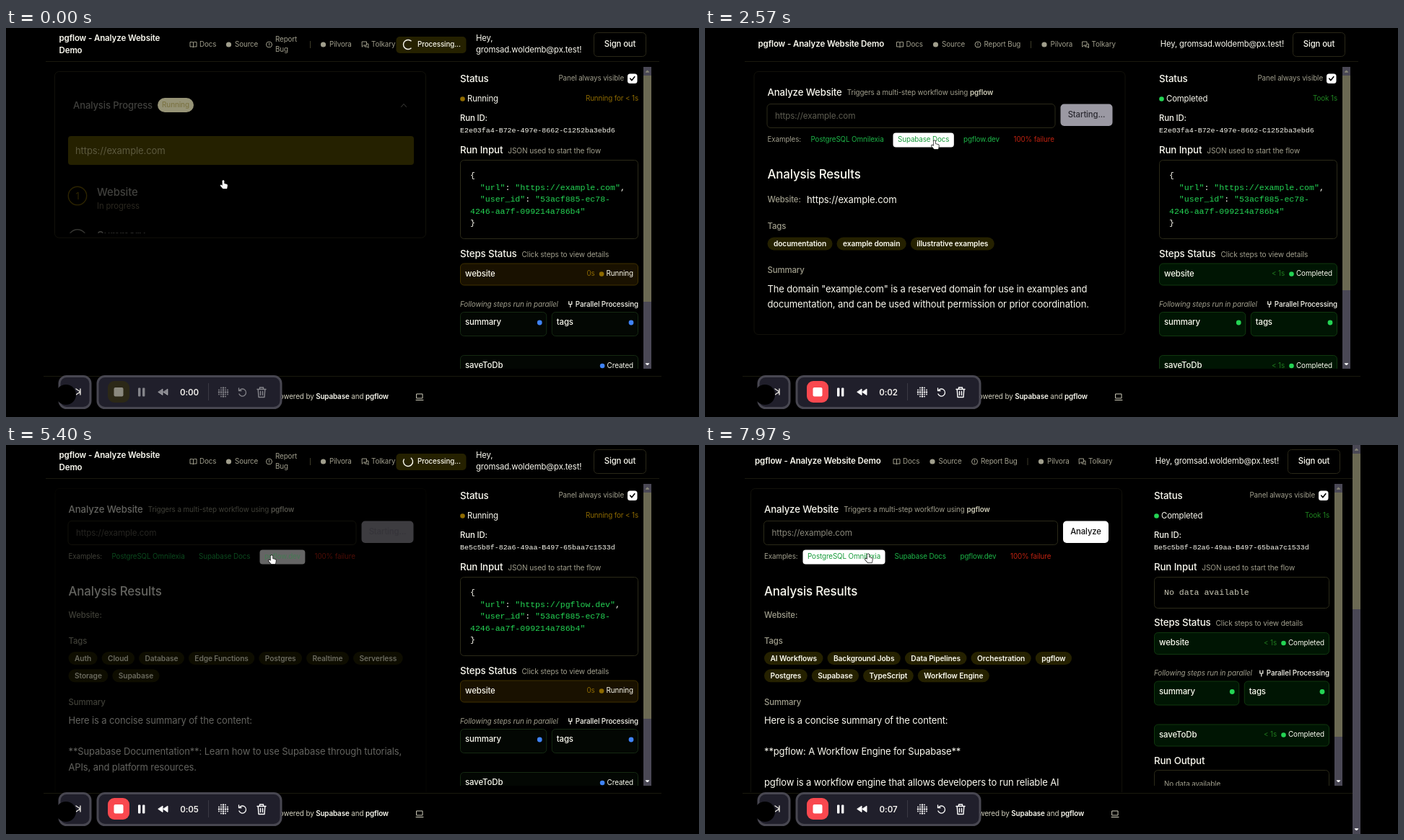
Animation, 960 px wide and 540 px high, one loop 8000 ms. Source, as an HTML page with a canvas:

```html
<!DOCTYPE html>
<html lang="en">
<head>
<meta charset="utf-8">
<title>pgflow demo</title>
<style>
  html, body { margin: 0; height: 100%; overflow: hidden; background: #000; }
  canvas { display: block; }
</style>
</head>
<body>
<canvas id="stage" width="960" height="540"></canvas>
<script>
const ctx = document.getElementById('stage').getContext('2d');
const LOOP = 8000;
const SANS = 'Inter, "Open Sans", sans-serif';
const MONO = '"Liberation Mono", "DejaVu Sans Mono", monospace';
const WHITE = '#fbfaf0', MUTED = '#a09e8c', DIM = '#89877a', LINE = '#1a190e', CARD = '#12110a';
const OLIVE = '#252100', GREEN = '#24d454', LINK = '#1db548', AMBER = '#8f6b00';
const EMAIL = 'gromsad.woldemb@px.test!';

const STATUS = {
  Completed: { bg: '#001503', border: '#10380f', dot: GREEN, time: '< 1s', timeColor: '#1f7a1f' },
  Running: { bg: '#191100', border: '#403000', dot: AMBER, time: '0s', timeColor: AMBER },
  Created: { bg: '#030703', border: '#152a12', dot: '#3f83f8', time: '', timeColor: DIM },
};

// web, tags, done and results are the moments at which each stage finishes.
const RUNS = [
  { start: -430, web: 350, tags: 800, done: 880, results: 1500, took: '1s', thumb: 0,
    id: 'E2e03fa4-B72e-497e-8662-C1252ba3ebd6', url: 'https://example.com', keepsInput: true,
    labels: [['documentation', 'example domain', 'illustrative examples']],
    summary: ['The domain "example.com" is a reserved domain for use in examples and',
      'documentation, and can be used without permission or prior coordination.'] },
  { start: 2650, web: 3000, tags: 3280, done: 3450, results: 3750, took: '< 1s', thumb: 282,
    id: '1b219c19-44de-43d9-92b3-E03d43b3d71a', url: 'https://supabase.com/docs',
    labels: [['Auth', 'Cloud', 'Database', 'Edge Functions', 'Postgres', 'Realtime', 'Serverless'],
      ['Storage', 'Supabase']],
    summary: ['Here is a concise summary of the content:', '',
      '**Supabase Documentation**: Learn how to use Supabase through tutorials,',
      'APIs, and platform resources.'] },
  { start: 5250, web: 5600, tags: 6100, done: 6250, results: 6500, took: '1s', thumb: 228,
    id: 'Be5c5b8f-82a6-49aa-B497-65baa7c1533d', url: 'https://pgflow.dev',
    labels: [['AI Workflows', 'Background Jobs', 'Data Pipelines', 'Orchestration', 'pgflow'],
      ['Postgres', 'Supabase', 'TypeScript', 'Workflow Engine']],
    summary: ['Here is a concise summary of the content:', '',
      '**pgflow: A Workflow Engine for Supabase**', '',
      'pgflow is a workflow engine that allows developers to run reliable AI'] },
];

const EXAMPLES = [['PostgreSQL Omnilexia', 60], ['Supabase Docs', 180.5],
  ['pgflow.dev', 271.5], ['100% failure', 341]];

const POINTER = [[0, 301, 212], [1000, 301, 212], [1200, 307, 210], [1750, 307, 210],
  [2300, 318, 157], [4250, 318, 157], [4850, 368, 154], [6750, 368, 154], [7550, 226, 152], [LOOP, 226, 152]];

const clamp = v => Math.min(1, Math.max(0, v));
const ease = v => v * v * (3 - 2 * v);

function setFont(size, { weight = 400, font = SANS, style = '' } = {}) {
  ctx.font = `${style} ${weight} ${size}px ${font}`;
  ctx.letterSpacing = font === SANS ? `${-0.01 * size}px` : '0px';
}

function textWidth(str, size, options) {
  setFont(size, options);
  return ctx.measureText(str).width;
}

// Draws text centred vertically on y and returns its width.
function text(str, x, y, size, color = WHITE, options = {}) {
  setFont(size, options);
  ctx.textAlign = options.align || 'left';
  ctx.fillStyle = color;
  ctx.fillText(str, x, y + size * 0.35);
  return ctx.measureText(str).width;
}

function box(x, y, w, h, r, fill, stroke, lineWidth = 1) {
  ctx.beginPath();
  ctx.roundRect(x, y, w, h, r);
  if (fill) { ctx.fillStyle = fill; ctx.fill(); }
  if (stroke) { ctx.strokeStyle = stroke; ctx.lineWidth = lineWidth; ctx.stroke(); }
}

function circle(x, y, r, fill, stroke, lineWidth = 1) {
  box(x - r, y - r, 2 * r, 2 * r, r, fill, stroke, lineWidth);
}

function path(d, x, y, color, lineWidth = 1, filled = false) {
  ctx.save();
  ctx.translate(x, y);
  ctx.lineCap = ctx.lineJoin = 'round';
  ctx.strokeStyle = ctx.fillStyle = color;
  ctx.lineWidth = lineWidth;
  const shape = new Path2D(d);
  if (filled) ctx.fill(shape);
  ctx.stroke(shape);
  ctx.restore();
}

function clipped(x, y, w, h, draw) {
  ctx.save();
  ctx.beginPath();
  ctx.rect(x, y, w, h);
  ctx.clip();
  draw();
  ctx.restore();
}

function faded(alpha, draw) {
  ctx.save();
  ctx.globalAlpha *= clamp(alpha);
  draw();
  ctx.restore();
}

const hline = (x1, x2, y) => box(x1, y, x2 - x1, 1, 0, LINE);

function scrollbar(x, top, bottom, thumbEnd) {
  box(x, top, 11, bottom - top, 0, '#4a4855');
  box(x, top + 12, 11, thumbEnd - top - 12, 0, '#6b6953');
  path('M-2 1L0 -1L2 1Z', x + 5.5, top + 6, '#8a8878', 1, true);
  path('M-2 -1L0 1L2 -1Z', x + 5.5, bottom - 6, '#fff', 1, true);
}

function navIcon(kind, x, y) {
  if (kind === 'book') path('M0 -3Q-2 -4 -4.5 -3.5V3Q-2 2.5 0 3.5Q2 2.5 4.5 3V-3.5Q2 -4 0 -3V3.5', x, y, MUTED);
  else if (kind === 'chat') path('M-4 -4H2V1H-2L-4 3ZM3 -1H4.5V4.5L3 3H-0.5V1.5', x, y, MUTED);
  else if (kind === 'alert') { circle(x, y, 4, null, MUTED); path('M0 -2V0.3M0 2V2.1', x, y, MUTED); }
  else circle(x, y, 3.6, MUTED);
}

function header(s) {
  const { dx, busy, run, t } = s;
  const bold = { weight: 600 };
  if (busy) {
    text('pgflow - Analyze Website', 73.5, 14, 11.5, WHITE, bold);
    text('Demo', 73.5, 30.5, 11.5, WHITE, bold);
  } else text('pgflow - Analyze Website Demo', 73.5 - dx, 22, 11.5, WHITE, bold);

  const xs = busy ? [268, 317, 373, 448, 506] : [278.5, 328, 386.5, 478.5, 535.5].map(x => x - dx);
  ['Docs', 'Source', 'Report Bug', 'Pilvora', 'Tolkary'].forEach((label, i) => {
    navIcon(['book', 'dot', 'alert', 'dot', 'chat'][i], xs[i] - 8.5, 23);
    if (busy && i === 2) {
      text('Report', xs[i], 16, 9.8, MUTED);
      text('Bug', xs[i], 29.5, 9.8, MUTED);
    } else text(label, xs[i], 23, 9.8, MUTED);
  });
  box(busy ? 421 : 451 - dx, 18, 1, 10, 0, '#3d3b28');

  const shift = dx ? 7 : 0;
  if (busy) {
    box(540.5, 12, 97, 23, 5, OLIVE);
    const gap = ((t - run.start) / 1000 - 0.43) * Math.PI * 2;
    ctx.beginPath();
    ctx.arc(557, 23, 6.5, gap + 0.8, gap + Math.PI * 2 - 0.8);
    ctx.strokeStyle = WHITE;
    ctx.lineWidth = 1.4;
    ctx.stroke();
    text('Processing...', 570, 23, 9.8, WHITE, { weight: 500 });
    text('Hey,', 651, 14, 11.3);
    text(EMAIL, 651, 30.5, 11.3);
  } else text('Hey, ' + EMAIL, 802 - shift, 22, 11.2, WHITE, { align: 'right' });
  box(814.5 - shift, 6.5, 72, 33, 5, null, '#2a2818');
  text('Sign out', 850.5 - shift, 22, 11.3, WHITE, { weight: 500, align: 'center' });
  hline(55, dx ? 897 : 905, 46);
}

function stepBox(x, y, w, h, name, state, compact) {
  const look = STATUS[state], right = x + w;
  box(x + 0.5, y + 0.5, w - 1, h - 1, 5, look.bg, look.border);
  text(name, x + 7, y + 14.5, 11.4, WHITE, { weight: 500 });
  if (compact) return circle(right - 10, y + 15, 3.4, look.dot);
  const width = text(state, right - 7, y + 14.5, 9.9, WHITE, { align: 'right' });
  circle(right - 13.5 - width, y + 15, 3.3, look.dot);
  text(look.time, right - 23 - width, y + 14.5, 9.8, look.timeColor, { align: 'right' });
}

function panel(s) {
  const { run, phase, dx, json } = s;
  const x = dx ? 622 : 629, w = dx ? 243 : 247, right = x + w;
  const complete = phase >= 3;
  const heading = (label, y, note) => {
    const width = text(label, x, y, 13.3, WHITE, { weight: 500 });
    if (note) text(note, x + width + 7, y + 1, 10.1, MUTED);
  };
  clipped(x - 10, 50, w + 20, 423, () => {
    heading('Status', 70);
    text('Panel always visible', right - 20, 70, 9.8, MUTED, { align: 'right' });
    box(right - 15, 63.5, 13.5, 13.5, 3.5, '#fff');
    path('M-3 0L-1 2.5L3 -2.5', right - 8.2, 70.2, '#000', 1.6);
    const state = complete ? 'Completed' : 'Running';
    circle(x + 3.5, 98.5, 3.3, STATUS[state].dot);
    text(state, x + 10, 98, 11.3);
    text(complete ? 'Took ' + run.took : 'Running for < 1s', right, 98, 9.8,
      complete ? '#1f8420' : AMBER, { align: 'right' });
    text('Run ID:', x, 125, 11.3, WHITE, { weight: 500 });
    text(run.id, x, 142, 9.95, WHITE, { font: MONO });

    heading('Run Input', 169.5, 'JSON used to start the flow');
    box(x + 0.5, 183.5, w - 1, json ? 109 : 43, 5, null, '#2b2a18');
    const code = (str, col, y, color) => text(str, x + 14 + col * 6.93, y, 11.55, color, { font: MONO });
    if (json) {
      code('{', 0, 204, WHITE);
      code('"url"', 2, 220.5, GREEN);
      code(':', 7, 220.5, WHITE);
      code(`"${run.url}"`, 9, 220.5, GREEN);
      code(',', 11 + run.url.length, 220.5, WHITE);
      code('"user_id"', 2, 237, GREEN);
      code(':', 11, 237, WHITE);
      code('"53acf885-ec78-', 13, 237, GREEN);
      code('4246-aa7f-099214a786b4"', 0, 253.5, GREEN);
      code('}', 0, 270, WHITE);
    } else code('No data available', 0, 204, '#c9c7b4');

    const y = json ? 66.5 : 0, half = (w - 6.5) / 2;
    heading('Steps Status', 246.5 + y, 'Click steps to view details');
    stepBox(x, 260 + y, w, 31, 'website', phase ? 'Completed' : 'Running');
    text('Following steps run in parallel', x, 317 + y, 9.9, MUTED, { style: 'italic' });
    const label = text('Parallel Processing', right, 317 + y, 9.8, WHITE, { weight: 500, align: 'right' });
    path('M-2 -4V0H2V-4M0 0V4', right - label - 7, 317 + y, WHITE, 1.2);
    const mid = ['Created', 'Running', 'Running', 'Completed'][Math.min(phase, 3)];
    const early = phase === 2;
    stepBox(x, 327.5 + y, half, 34, early ? 'tags' : 'summary', early ? 'Completed' : mid, true);
    stepBox(right - half, 327.5 + y, half, 34, early ? 'summary' : 'tags', mid, true);
    stepBox(x, 387.5 + y, w, 31, 'saveToDb', complete ? 'Completed' : 'Created');
    heading('Run Output', 438 + y);
    if (complete) {
      box(x + 0.5, 451.5 + y, w - 1, 60, 5, null, '#2b2a18');
      text('No data available', x + 14, 471 + y, 9.8, MUTED);
    } else text('Run is not completed yet - no output available', x, 458 + y, 9.9, MUTED);
  });
  scrollbar(dx ? 872 : 883, 54, 473, complete ? (json ? 364 : 405) : (json ? 380 : 428));
}

function step(cx, y, name, state, number) {
  const cy = y + 5;
  const color = { Completed: GREEN, 'In progress': '#b08c00', Waiting: '#d5d3c4' }[state];
  if (state === 'Completed') {
    circle(cx, cy, 13.3, GREEN);
    path('M-4 0L-1 3L4 -3', cx, cy, '#fff', 1.3);
  } else {
    circle(cx, cy, 12.7, null, color, 1.4);
    text(number, cx, cy, 13, color, { align: 'center' });
  }
  text(name, cx + 27, y, 14.9, WHITE, { weight: 500 });
  text(state, cx + 27, y + 19.5, 11.3, state === 'In progress' ? '#a5997a' : MUTED);
}

function progressCard({ run, phase, json, t }) {
  const enter = clamp((t - run.start - 355) / 300);
  if (!enter) return;
  const drop = 12 * (1 - enter), bottom = (json ? 441 : 421) - 200 * (1 - enter);
  const titleY = json ? 98 : 97;
  box(67.5, 60.5, 514, bottom - 61, 6, null, CARD);
  clipped(60, 50, 530, bottom - 57, () => {
    ctx.translate(0, drop);
    box(86, json ? 141 : 140, 479, json ? 40 : 20.5, 4, OLIVE);
    faded(enter ** 0.3, () => {
      box(210, titleY - 10, 50, 20, 10, '#e2deb2');
      text('Running', 235, titleY, 9.8, '#6f652c', { align: 'center', weight: 500 });
    });
    faded(enter, () => {
      text('Analysis Progress', 93, titleY, 13.1, WHITE, { weight: 500 });
      path('M-3.5 2L0 -2L3.5 2', 551, titleY + 0.5, WHITE);
      if (json) text(run.url, 96, 161, 13.1);
      const ys = json ? [219, 278.5, 338.5, 398] : [200, 274, 316, 375.5];
      step(99, ys[0], 'Website', phase ? 'Completed' : 'In progress', '1');
      step(99, ys[1], 'Summary', phase ? 'In progress' : 'Waiting', json ? '2' : '4');
      step(99, ys[2], 'Tags', ['Waiting', 'In progress', 'Completed'][phase], '3');
      step(99, ys[3], 'SaveToDb', 'Waiting', json ? '4' : '3');
    });
  });
}

function results(run, x, json) {
  const top = json ? 275.5 : 272;
  const bold = { weight: 600 };
  text('Analysis Results', x, 203, 16.9, WHITE, { weight: 500 });
  text('Website:', x, json ? 238 : 236, 11.3, MUTED, { weight: 500 });
  if (json) text(run.url, x + 54.5, 238, 13.1);
  text('Tags', x, top, 11.4, MUTED, { weight: 500 });
  run.labels.forEach((row, i) => {
    let left = x;
    const y = top + 24 + i * 24.3;
    for (const label of row) {
      const w = textWidth(label, 10.2, bold) + 17;
      box(left, y - 9, w, 18, 9, OLIVE);
      text(label, left + 8.5, y, 10.2, WHITE, bold);
      left += w + 6;
    }
  });
  const y = top + 60.5 + 24.3 * (run.labels.length - 1);
  text('Summary', x, y, 11.4, MUTED, { weight: 500 });
  run.summary.forEach((line, i) => text(line, x, y + 26 + i * 21.5, 13));
}

function hoveredExample(s) {
  const left = s.dx ? 82 : 86.5;
  if (s.py < 145 || s.py > 165) return -1;
  return EXAMPLES.findIndex(([label, off]) =>
    s.px > left + off - 7 && s.px < left + off + textWidth(label, 9.8) + 7);
}

function homeCard(s) {
  const { run, dx, phase, json, starting, t } = s;
  const x = dx ? 82 : 86.5, right = dx ? 559 : 564.5;
  clipped(60, 50, 525, 432, () => {
    box(x - 18.5, 60.5, 514, json ? 365 : 460, 6, null, CARD);
    const width = text('Analyze Website', x, 89, 13.2, WHITE, { weight: 500 });
    const noteX = x + width + 7;
    const note = text('Triggers a multi-step workflow using ', noteX, 90, 9.9, MUTED);
    text('pgflow', noteX + note, 90, 9.9, '#cfcdb8', { weight: 600 });

    const bw = starting ? 72 : 63;
    box(x - 0.5, 105.5, right - bw - 7 - x, 33, 5, null, '#2b2a18');
    text('https://example.com', x + 10.5, 122, 11.7, starting ? '#5d5c50' : DIM);
    box(right - bw, 105.5, bw, 30.5, 5, starting ? '#9b99a3' : '#fff');
    text(starting ? 'Starting...' : 'Analyze', right - bw / 2, 120.5, 11.3, starting ? '#2a2930' : '#111',
      { weight: 500, align: 'center' });

    text('Examples:', x, 155, 9.8, MUTED);
    const hover = hoveredExample(s);
    EXAMPLES.forEach(([label, off], i) => {
      if (i === hover) box(x + off - 6.5, 145.5, textWidth(label, 9.8) + 13, 20, 4, '#fff');
      text(label, x + off, 155, 9.8, i === 3 ? '#c22210' : i === hover ? '#159a38' : LINK);
    });

    if (phase < 4) {
      box(x - 1, 233, 479, 20.5, 4, OLIVE);
      box(x + 392, 185.5, 84, 20, 5, null, '#39371f');
      text('close details', x + 399, 195.5, 9.9, MUTED);
      path('M-2.7 -2.7L2.7 2.7M2.7 -2.7L-2.7 2.7', x + 464.5, 195.5, MUTED);
      ['Website', 'Summary', 'Tags', 'SaveToDb'].forEach((name, i) =>
        step(x + 16.5, [218, 290, 330.5, 390.5][i], name, 'Completed'));
    } else faded((t - run.results) / 200, () => results(run, x, json));
  });
}

function footer(dx) {
  hline(52, dx ? 897 : 908, 483);
  let x = 530 - dx * 1.1;
  for (const [word, weight] of [['pgflow', 600], [' and ', 400], ['Supabase', 600], ['Powered by ', 400]])
    x -= text(word, x, 511.5, 9.8, weight > 400 ? WHITE : '#d0cebc', { weight, align: 'right' });
  path('M-4 -4H4V2H-4ZM-5 4.5H5', 573 - dx * 1.1, 512, '#d0cebc');
}

function recorder(t) {
  const live = clamp(t / 200);
  for (const [x, w] of [[74, 43], [127, 254]]) box(x, 483.5, w, 44, 10, '#201f2b', '#484751', 3);
  path('M-3 -4L3 0L-3 4M3 -4V4', 100, 505, '#e8e6e0', 1.4);
  circle(83, 509, 14, '#000');
  box(141, 490, 30, 30, 9, '#2c2918');
  faded(live, () => box(141, 490, 30, 30, 9, '#f9484f'));
  faded(0.45 + 0.55 * live, () => {
    box(149.5, 499, 13, 12.5, 2, '#fff');
    box(183, 499.5, 3.4, 12, 1, '#fff');
    box(189, 499.5, 3.4, 12, 1, '#fff');
    path('M0 -4V4L-6 0ZM7 -4V4L1 0Z', 217, 505.5, '#fff', 1, true);
    for (let i = -2; i <= 2; i++) for (let j = -2; j <= 2; j++)
      if (Math.abs(i) + Math.abs(j) < 4) circle(301 + i * 3, 505.5 + j * 3, i && j ? 0.9 : 1.2, '#fff');
    path('M-4 -2.5A5 5 0 1 1 -4.6 2.5M-5 -5.5V-2H-1.5', 327.5, 505.5, '#fff', 1.3);
    path('M-6 -4H6M-2.5 -4V-6.5H2.5V-4M-4.8 -4L-4 7H4L4.8 -4M-1.5 -1V4M1.5 -1V4', 354, 505.5, '#fff', 1.4);
  });
  box(280, 493, 1, 24, 0, '#3a3944');
  const seconds = Math.max(0, Math.floor((t - 30) / 1000));
  text('0:0' + seconds, 254, 505.5, 11.5, '#f4f2ee', { weight: 600, align: 'center' });
}

function pointer(s) {
  const hand = s.busy || hoveredExample(s) >= 0;
  const d = hand
    ? 'M-1.2 0Q0 -1.4 1.2 0V4L5 5Q6 5.5 5.8 7L5 11H-0.5L-4 7Q-4 5 -2.5 6L-1.2 7Z'
    : 'M0 0V11L2.7 8.5L4.5 12.3L6.3 11.5L4.6 7.8H8Z';
  path(d, s.px, s.py, hand ? '#000' : '#fff', hand ? 1.6 : 1.4, true);
  path(d, s.px, s.py, hand ? '#fff' : '#000', 0.3, true);
}

function pointerAt(t) {
  const i = POINTER.findIndex(k => k[0] > t);
  const [t0, x0, y0] = POINTER[i - 1], [t1, x1, y1] = POINTER[i];
  const e = ease((t - t0) / (t1 - t0));
  return { px: x0 + (x1 - x0) * e, py: y0 + (y1 - y0) * e };
}

function stateAt(t) {
  const index = RUNS.findLastIndex(r => t >= r.start);
  const run = RUNS[index], next = RUNS[index + 1];
  const phase = ['web', 'tags', 'done', 'results'].filter(key => t >= run[key]).length;
  const json = phase < 2 || (phase === 4 && !!run.keepsInput);
  return { t, run, phase, json, previous: RUNS[index - 1], busy: phase < 3,
    dx: phase >= 3 && !json ? 4.5 : 0,
    starting: !!next && t >= next.start - 120, ...pointerAt(t) };
}

function draw(t) {
  const s = stateAt(t);
  ctx.fillStyle = '#000';
  ctx.fillRect(0, 0, 960, 540);
  header(s);
  if (s.busy) {
    const leaving = 1 - (t - s.run.start) / 250;
    if (s.previous && leaving > 0)
      faded(leaving, () => homeCard({ ...s, run: s.previous, phase: 4, json: !!s.previous.keepsInput, starting: true }));
    progressCard(s);
  } else homeCard(s);
  panel(s);
  footer(s.dx);
  if (s.dx) scrollbar(897, 0, 540, s.phase < 4 ? 350 : s.run.thumb);
  recorder(t);
  pointer(s);
}

const begin = performance.now();
function tick() {
  draw((performance.now() - begin) % LOOP);
  requestAnimationFrame(tick);
}
tick();
</script>
</body>
</html>
```
